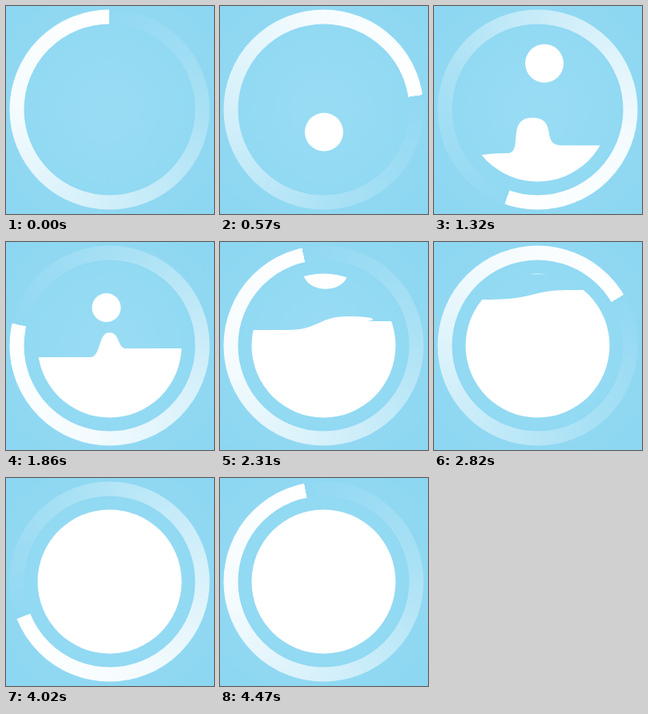
An HTML page with a canvas that plays this animation: 260x260 px, repeating every 4500 ms.

```html
<!DOCTYPE html>
<html lang="en">
<head>
<meta charset="utf-8">
<title>Filling circle loader</title>
<style>
html, body { margin: 0; width: 100%; height: 100%; overflow: hidden; background: #92d9f2; }
canvas { display: block; }
</style>
</head>
<body>
<canvas id="stage" width="260" height="260"></canvas>
<script>
const ctx = document.getElementById('stage').getContext('2d');
const LOOP = 4500, STEP = 30, C = 129.5, GRAVITY = .0013, RIM = 38, DETACH = 90;
const clamp = v => Math.max(0, Math.min(1, v));

const drops = [
  { start: 240, x: 130, r: 24 }, { start: 770, x: 131.5, r: 24 },
  { start: 1113, x: 138, r: 24 }, { start: 1645, x: 125.5, r: 18 },
  { start: 2190, x: 132, r: 15 }, { start: 2807, x: 130, r: 12 }
];

function drawBackground() {
  const g = ctx.createRadialGradient(C, C, 20, C, C, 185);
  g.addColorStop(0, '#98dcf4');
  g.addColorStop(1, '#8cd6f1');
  ctx.fillStyle = g;
  ctx.fillRect(0, 0, 260, 260);
}

// Two turns per loop with a slight sway, speeding up towards the end
function ringAngle(t) {
  const rush = clamp((t - 3780) / 720);
  return .15 * t - 4 * Math.sin(2 * Math.PI * t / 2400) + 40 * rush ** 3;
}

function drawRing(t) {
  const head = (ringAngle(t) % 360 - 90) * Math.PI / 180;
  const g = ctx.createConicGradient(head, C, C);
  [0, .22, .58, .9, 1].forEach((alpha, i) =>
    g.addColorStop(i / 4, `rgba(255,255,255,${alpha})`));
  ctx.strokeStyle = g;
  ctx.lineWidth = 18;
  ctx.beginPath();
  ctx.arc(C, C, 116, 0, 7);
  ctx.stroke();
}

// A rising, tilted surface with one splash that swings in from the left,
// shrinks, and then spreads out into a low wave
function drawLiquid(t) {
  const phase = (t - 960) / 900, p = clamp(phase), late = Math.max(0, phase - 1);
  const grow = clamp((t - 570) / 390);
  const lean = (1 - p) ** 3, surge = lean ** 2;
  const wave = Math.max(0, Math.sin(Math.min(late, 2) * Math.PI / 2));

  const level = Math.max(207 - .076 * (t - 960), 66 - .027 * (t - 2820));
  const tilt = 11 + 12 * clamp(late - 1);
  const left = level + tilt / 2 - 22 * surge * grow;
  const right = level - tilt / 2;
  const height = 54 * grow * .47 ** Math.max(0, phase) * clamp(2 - phase);
  const top = level - height - tilt / 2 * clamp(late);

  const x = 129 - 29 * lean - 8 * late + 50 * wave;
  const neck = 10 + 35 * wave, bulge = 46 - 32 * p + 35 * wave;
  const xl = x - 36 + 12 * p - 75 * wave, xr = x + 47 - 26 * p;
  const ml = (30 + xl) / 2, mr = (230 + xr) / 2;
  const leftRim = left + 90 * surge;

  ctx.beginPath();
  ctx.moveTo(30, 300);
  ctx.lineTo(30, leftRim);
  ctx.bezierCurveTo(ml, leftRim, ml, left, xl, left);
  ctx.bezierCurveTo(x - neck, left, x - bulge, top, x, top);
  ctx.bezierCurveTo(x + bulge, top, x + neck, right, xr, right);
  ctx.bezierCurveTo(mr, right, mr, right, 230, right);
  ctx.lineTo(230, 300);
  ctx.fill();
}

// Hangs from the rim as a bulge, then falls as a ball
function drawDrop(t, { start, x, r }) {
  const age = t - start;
  if (age < 0 || age > 480) return;
  const bottom = 40 + GRAVITY * age * age;
  ctx.beginPath();
  if (bottom < DETACH) {
    const w = r + 14, shoulder = RIM + (bottom - RIM) * .6;
    ctx.moveTo(x - w, RIM);
    ctx.bezierCurveTo(x - w + 3, shoulder, x - 16, bottom, x, bottom);
    ctx.bezierCurveTo(x + 16, bottom, x + w - 3, shoulder, x + w, RIM);
  } else {
    ctx.arc(x, bottom - r, r, 0, 7);
  }
  ctx.fill();
}

function frame(now) {
  const t = Math.floor(now % LOOP / STEP) * STEP;
  drawBackground();
  drawRing(t);
  ctx.save();
  ctx.beginPath();
  ctx.arc(C, C, 90, 0, 7);
  ctx.clip();
  ctx.fillStyle = '#fff';
  drawLiquid(t);
  drops.forEach(drop => drawDrop(t, drop));
  ctx.restore();
  requestAnimationFrame(frame);
}
requestAnimationFrame(frame);
</script>
</body>
</html>
```
